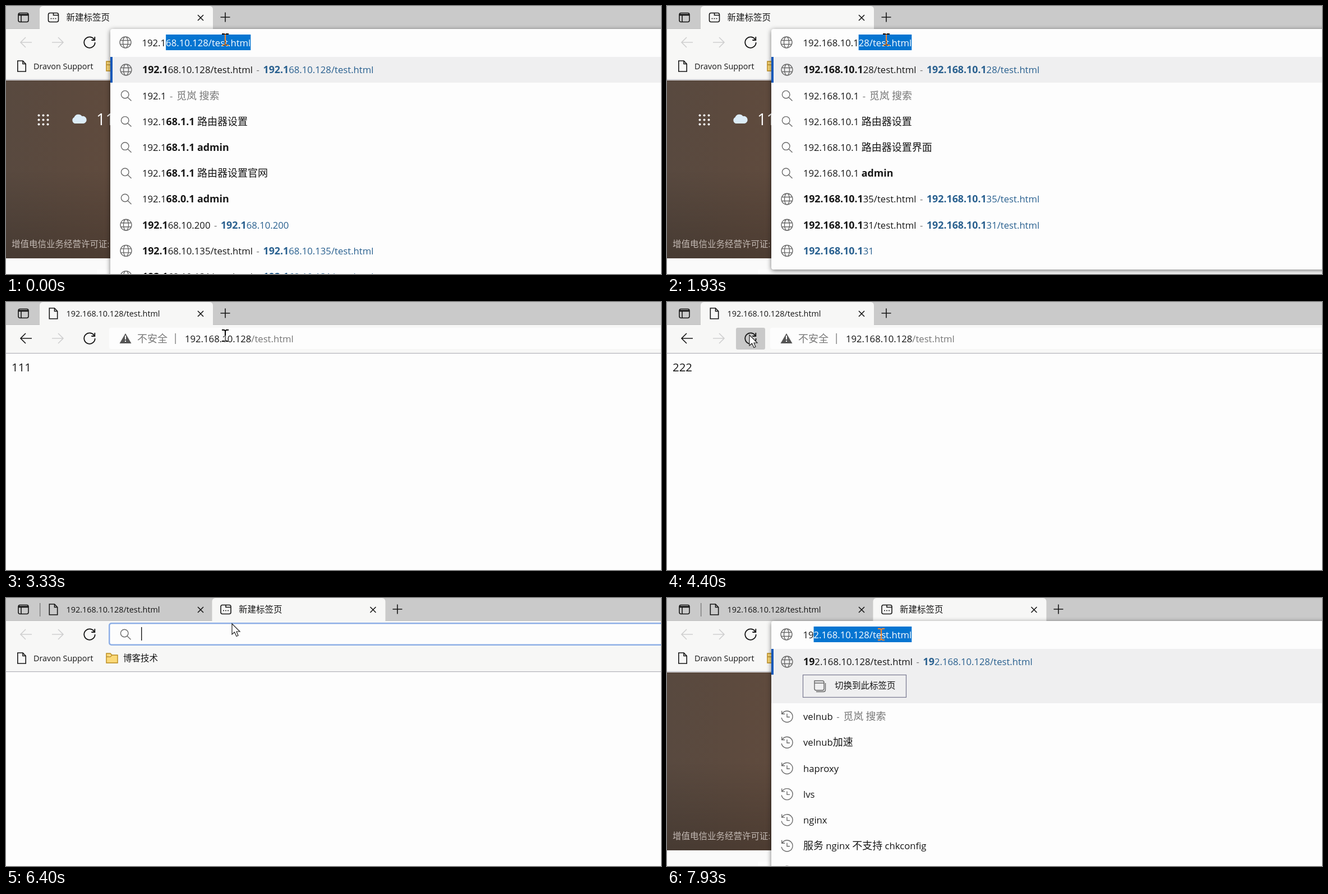
Recreate the animation shown at these times as an HTML page with a canvas. Size 1168 by 479 pixels, loop 8000 ms.

```html
<!DOCTYPE html>
<html lang="zh">
<head>
<meta charset="utf-8">
<style>
html, body { margin: 0; width: 1168px; height: 479px; overflow: hidden; }
canvas { display: block; }
</style>
</head>
<body>
<canvas id="stage" width="1168" height="479"></canvas>
<script>
const ctx = document.getElementById('stage').getContext('2d');
const URL_TEXT = '192.168.10.128/test.html';
const INK = '#161616', GRAY = '#777', BLUE = '#29608f', WHITE = '#fdfdfd', BAR = '#f7f7f6';
const ROW = 46.2;

// Icon outlines, centred on the origin
const FRAME = 'M-6 -8H6Q9 -8 9 -5V5Q9 8 6 8H-6Q-9 8 -9 5V-5Q-9 -8 -6 -8Z';
const ICON = {
  window: FRAME + 'M-9 -5.5H9M-9 -4H9M-4 -5V8',
  newTab: FRAME + 'M0 -8V-4H9M-5 2h2M-1 2h2M3 2h2',
  file: 'M-7.2 -9.5H2L7.2 -4V9.5H-7.2ZM2 -9.5V-4H7.2',
  close: 'M-5 -5L5 5M5 -5L-5 5',
  plus: 'M-8.5 0H8.5M0 -8.5V8.5',
  back: 'M10 0H-10M-1 -9L-10 0L-1 9',
  forward: 'M-10 0H10M1 -9L10 0L1 9',
  reload: 'M8.8 -4A9.7 9.7 0 1 0 9.7 0M9.3 -10V-4H3.3',
  stop: 'M-7 -7L7 7M7 -7L-7 7',
  globe: 'M10 0A10 10 0 1 0 -10 0A10 10 0 1 0 10 0M4.5 0A4.5 10 0 1 0 -4.5 0A4.5 10 0 1 0 4.5 0M-9.4 -3.5H9.4M-9.4 3.5H9.4',
  search: 'M5 -2A6.8 6.8 0 1 0 -8.6 -2A6.8 6.8 0 1 0 5 -2M3 3L9.5 9.2',
  history: 'M-8.5 -5A10 10 0 1 1 -9.8 2M-9.3 -10V-4.5H-3.8M0 -5V1H5',
  folder: 'M-10 -8H-3L0 -5H10V9H-10ZM-10 -2H-3L0 -5',
  windows: 'M-9 -9H5Q8 -9 8 -6V5Q8 8 5 8H-6Q-9 8 -9 5ZM-9 -5H8M-6 10.5H7Q10.5 10.5 10.5 7V-5',
  arrow: 'M0 0V19L4.5 15L8 22.5L11 21L8 14H14Z',
  beam: 'M-6 -10H-2L0 -8.5L2 -10H6M0 -9V9M-6 10H-2L0 8.5L2 10H6',
  warning: 'M0 -9L10.5 9H-10.5Z',
  cloud: 'M-8 8A6 6 0 0 1 -9 -3A8 8 0 0 1 5 -5A6.5 6.5 0 0 1 8 8Z'
};

// Kinds: g titled address, b bare address, s search, q search with engine, h history, r history with engine
const SHORT = ['g' + URL_TEXT, 'q', 's192.168.1.1 路由器设置', 's192.168.1.1 admin', 's192.168.1.1 路由器设置官网',
  's192.168.0.1 admin', 'g192.168.10.200', 'g192.168.10.135/test.html', 'g192.168.10.131/test.html'];
const LONG = ['g' + URL_TEXT, 'q', 's192.168.10.1 路由器设置', 's192.168.10.1 路由器设置界面', 's192.168.10.1 admin',
  'g192.168.10.135/test.html', 'g192.168.10.131/test.html', 'b192.168.10.131'];
const RECENT = ['rhaproxy', 'h服务 nginx 不支持 chkconfig', 'hnginx', 'hvelnub加速', 'hlvs', 'h栎朗官网', 'h负载均衡群集', 'hvelnub'];
const AGAIN = ['rvelnub', 'hvelnub加速', 'hhaproxy', 'hlvs', 'hnginx', 'h服务 nginx 不支持 chkconfig', 'h栎朗官网'];

const TILES = [['Tapwix', '#d3d5d7'], ['短链接', '#3a7be0'], ['euVexo 免费...', '#2d9fe6'],
  ['在线去水印', '#f5d63a'], ['在线Gif免费...', '#2b9bdc'], ['MySQL', '#15648c']];
const SITES = [['觅岚', '#0f7a70', 20], ['沐川', '#3b78e8', 19], ['乐岚屿', '#3da645', 19], ['朔汀', '#55b04a', 10],
  ['栩沐', '#e8408f', 17], ['柚岚TV', '#8a6a60', 9], ['噗噜噗噜', '#3fa5dc', 19], ['VQTV', '#555', 8]];

// time, x, y of the pointer
const POINTER = [[0, 391, 60], [3730, 391, 60], [4200, 147, 59], [5600, 147, 59], [6000, 391, 20],
  [6130, 391, 20], [6400, 403, 46], [6900, 382, 65], [8000, 382, 65]];

function rect(x, y, w, h, color, r = 0) {
  ctx.fillStyle = color;
  ctx.beginPath();
  ctx.roundRect(x, y, w, h, r);
  ctx.fill();
}

function icon(name, x, y, color = INK, width = 1.6, fill) {
  const path = new Path2D(ICON[name]);
  ctx.save();
  ctx.translate(x, y);
  if (fill) { ctx.fillStyle = fill; ctx.fill(path); }
  ctx.strokeStyle = color;
  ctx.lineWidth = width;
  if (width) ctx.stroke(path);
  ctx.restore();
}

// Draws mixed Latin and Chinese text centred on y; returns the end x.
// Chinese only turns bold at weight 800.
function text(s, x, y, size = 18, color = INK, weight = 400) {
  ctx.fillStyle = color;
  for (const run of s.match(/[\u2e80-\uffef]+|[^\u2e80-\uffef]+/g) || []) {
    const cjk = run[0] >= '\u2e80';
    const px = size * (cjk ? 1 : weight > 400 ? 0.99 : 0.928);
    const face = cjk ? '' : '"Open Sans", ';
    ctx.font = `${cjk && weight < 800 ? 400 : weight} ${px}px ${face}"Noto Sans CJK SC", "Noto Sans CJK", sans-serif`;
    ctx.fillText(run, x, y + size * 0.35);
    x += ctx.measureText(run).width;
  }
  return x;
}

// Measures by drawing far outside the stage
function textWidth(s, size) {
  return text(s, 0, -2000, size);
}

function tab(x, active, glyph, title) {
  if (active) rect(x, 0, 309, 48, BAR, [6, 6, 0, 0]);
  if (glyph === 'spinner') rect(75, 22, 4, 4, '#1567c0', 2);
  else icon(glyph, x + 24.5, 20.5);
  text(title, x + 47.5, 20.5, 15.5);
  icon('close', x + 287, 21);
}

function toolbar(bottom, canGoBack, loading, hover) {
  rect(0, 41, 1168, bottom - 41, BAR);
  rect(0, bottom, 1168, 1.3, '#b4b4ba');
  if (hover) rect(123, 46, 52, 39, '#c9c9c9', 3);
  icon('back', 36, 65, canGoBack ? INK : '#cfcfcf');
  icon('forward', 92, 65, '#cfcfcf');
  icon(loading ? 'stop' : 'reload', 149, 65, INK, 1.8);
}

function bookmarks() {
  icon('file', 28, 107.5);
  text('Dravon Support', 49, 107.5, 15.5);
  icon('folder', 189, 107, '#b98a1e', 1.4, '#fbd978');
  text('博客技术', 209, 107.5, 15.5);
}

function polygon(points, color) {
  ctx.fillStyle = color;
  ctx.beginPath();
  points.forEach(([x, y]) => ctx.lineTo(x, y));
  ctx.fill();
}

function gradient(x, y, colors) {
  const g = ctx.createLinearGradient(0, 0, x, y);
  colors.forEach((c, i) => g.addColorStop(i / (colors.length - 1), c));
  return g;
}

function startPage(top, ready) {
  ctx.save();
  ctx.translate(0, top);
  rect(0, 0, 1168, 400, '#fafafa');
  rect(162, 338, 1006, 80, WHITE);
  rect(0, 0, 1168, 318, gradient(1168, 0, ['#58493f', '#614b3d', '#6c5648', '#614b42', '#4b3e3a', '#403a37']));
  polygon([[810, 0], [1168, 0], [1168, 160], [800, 140], [835, 90]], '#4e403c');
  polygon([[810, 0], [880, 6], [865, 60], [860, 125], [815, 135], [838, 50]], '#6b4b45');
  polygon([[625, 180], [665, 155], [760, 150], [815, 122], [890, 105], [1000, 120], [1168, 85], [1168, 318], [700, 318], [640, 250]], '#3d3932');
  polygon([[638, 232], [690, 240], [735, 318], [645, 318]], '#56403d');
  rect(0, 0, 1168, 318, gradient(0, 318, ['#0000', '#0000', '#0003']));
  text('增值电信业务经营许可证: 合字B2-20730416', 10, 292.5, 15.5, '#c3b9b3');
  if (ready) {
    for (let i = 0; i < 9; i++) rect(56.5 + i % 3 * 8, 60.5 + Math.floor(i / 3) * 8, 4, 4, '#fff', 2);
    icon('cloud', 130.5, 69, '#dcecf7', 0, '#dcecf7');
    text('11', 161, 69, 31, '#fff');
    text('℃', 197, 66, 18, '#fff');
    rect(461, 41, 760, 59, WHITE, 28);
    text('搜索网页', 481, 72.5, 20.5, '#666');
    TILES.forEach(([name, color], i) => {
      const x = 406 + i * 136.1;
      rect(x - 28.5, 168, 57, 57, WHITE, 14);
      rect(x - 15.5, 181, 31, 31, color, 2);
      text(name, x - textWidth(name, 15.5) / 2, 241.5, 15.5, '#fff');
    });
    SITES.forEach(([name, color, size], i) => {
      const x = 193 + i * 129.4;
      rect(x - size / 2, 371 - size / 2, size, size, color, 2);
      const bold = i === 5;
      text(name, x + 20, 373, 18, bold ? '#0a6cc8' : '#333', bold ? 800 : 400);
    });
  }
  ctx.restore();
}

function addressMatch(body, typed, x, y, color) {
  x = text(typed, x, y, 18, color, 700);
  return text(body.slice(typed.length), x, y, 18, color);
}

function dash(x, y) {
  text('-', x + 6.5, y, 18, GRAY);
  return x + 18.5;
}

function suggestion(entry, typed, y) {
  const kind = entry[0], body = entry.slice(1) || typed;
  icon('gb'.includes(kind) ? 'globe' : 'sq'.includes(kind) ? 'search' : 'history', 214, y, '#6a6a6a', 1.4);
  let x = 243;
  if (kind === 'g') x = dash(addressMatch(body, typed, x, y, INK), y);
  if ('gb'.includes(kind)) return addressMatch(body, typed, x, y, BLUE);
  if (kind === 's') {
    x = text(typed, x, y);
    return text(body.slice(typed.length), x, y, 18, INK, 700);
  }
  x = text(body, x, y);
  if ('qr'.includes(kind)) text('觅岚 搜索', dash(x, y), y, 18, GRAY);
}

function dropdown(list, typed, openTab) {
  const rows = list.filter(e => !'gbs'.includes(e[0]) || e.slice(1).startsWith(typed));
  const selected = typed ? (openTab ? 97 : 46) : 0;
  const first = openTab ? 211.8 : 114;
  ctx.save();
  ctx.shadowColor = '#0008';
  ctx.shadowBlur = 9;
  ctx.shadowOffsetY = 2;
  rect(186, 41, 1000, first + rows.length * ROW - 53.5, WHITE, 4);
  ctx.restore();
  if (selected) {
    rect(186, 91, 982, selected, '#efeff0');
    rect(186, 91, 4, 46, '#1458b8');
  }
  if (openTab) {
    suggestion('g' + URL_TEXT, typed, 114);
    ctx.strokeStyle = '#77778f';
    ctx.lineWidth = 1.2;
    ctx.strokeRect(242.5, 137.5, 184, 40);
    icon('windows', 272, 157, '#666', 1.4);
    text('切换到此标签页', 299, 157, 15.5);
  }
  rows.forEach((e, i) => suggestion(e, typed, first + i * ROW));

  icon(typed ? 'globe' : 'search', 213, 65, '#6a6a6a', 1.4);
  if (!typed) return caret();
  const x = text(typed, 242.5, 65.5), rest = URL_TEXT.slice(typed.length);
  rect(x, 51, textWidth(rest, 18), 28, '#0575d1');
  text(rest, x, 65.5, 18, '#fff');
}

function caret() {
  rect(241, 52, 1.4, 24, INK);
}

function siteAddress(reveal) {
  rect(184, 46, 1000, 38, WHITE, 4);
  icon('warning', 213, 65, '#555', 0, '#555');
  rect(212, 60, 2, 7, '#fff');
  rect(212, 69, 2, 2, '#fff');
  ctx.save();
  ctx.beginPath();
  ctx.rect(234, 46, reveal, 38);
  ctx.clip();
  text('不安全', 234, 65.5, 18, GRAY);
  ctx.restore();
  rect(247.5 + reveal, 56, 1.3, 19, '#777');
  const x = text(URL_TEXT.slice(0, 14), 265 + reveal, 65.5);
  text(URL_TEXT.slice(14), x, 65.5, 18, GRAY);
}

function pointerAt(t) {
  const i = POINTER.findIndex(k => k[0] > t);
  const [t0, x0, y0] = POINTER[i - 1], [t1, x1, y1] = POINTER[i];
  const u = (t - t0) / (t1 - t0), e = u * u * (3 - 2 * u);
  return [x0 + (x1 - x0) * e, y0 + (y1 - y0) * e];
}

function draw(t) {
  const [px, py] = pointerAt(t);
  const inBar = py > 48 && py < 85;
  const hover = inBar && px > 123 && px < 175;
  const second = t >= 6130;

  rect(0, 0, 1168, 479, WHITE);
  rect(0, 0, 1168, 41, '#cacaca');
  rect(0, 40, 1168, 1, '#bdbdbd');
  icon('window', 31, 20.5);

  if (t < 2530) {
    tab(60, true, 'newTab', '新建标签页');
    startPage(133, true);
    toolbar(131, false, false, false);
    bookmarks();
    const typed = URL_TEXT.slice(0, Math.min(12, 5 + Math.floor(t / 270)));
    dropdown(typed.length < 10 ? SHORT : LONG, typed);
  } else if (!second) {
    const opening = t < 2730, loading = t < 2800 || (t >= 4930 && t < 5130);
    tab(60, true, loading ? 'spinner' : 'file', URL_TEXT);
    if (opening) startPage(92, true);
    else text(t >= 4330 && t < 5130 ? '222' : '111', 10, 116, 22);
    toolbar(91, true, loading, hover);
    siteAddress(Math.min(54, (t - 2500) * 0.26));
  } else {
    rect(60, 9, 1.3, 24, '#777');
    tab(60, false, 'file', URL_TEXT);
    tab(367.5, true, 'newTab', '新建标签页');
    if (t >= 6600) startPage(133, false);
    toolbar(131, false, false, false);
    bookmarks();
    if (t >= 6730) {
      const typed = URL_TEXT.slice(0, t < 7530 ? 0 : t < 7800 ? 1 : 2);
      dropdown(typed ? AGAIN : RECENT, typed, !!typed);
    } else {
      rect(183, 44, 1000, 41, '#8eafe6', 5);
      rect(185.5, 46.5, 1000, 36, WHITE, 3);
      icon('search', 213, 65, '#6a6a6a', 1.4);
      caret();
    }
  }
  icon('plus', second ? 698 : 391, 20);

  if (inBar && px > 184) {
    ctx.globalCompositeOperation = 'difference';
    icon('beam', px, py, '#fff', 2);
    ctx.globalCompositeOperation = 'source-over';
  } else {
    icon('arrow', px, py, '#222', 1.2, '#fff');
  }
}

function loop(now) {
  // Steps alternate between 130 and 70 ms
  const t = now % 8000, part = t % 200;
  draw(t - part + (part >= 130 ? 130 : 0));
  requestAnimationFrame(loop);
}
requestAnimationFrame(loop);
</script>
</body>
</html>
```
